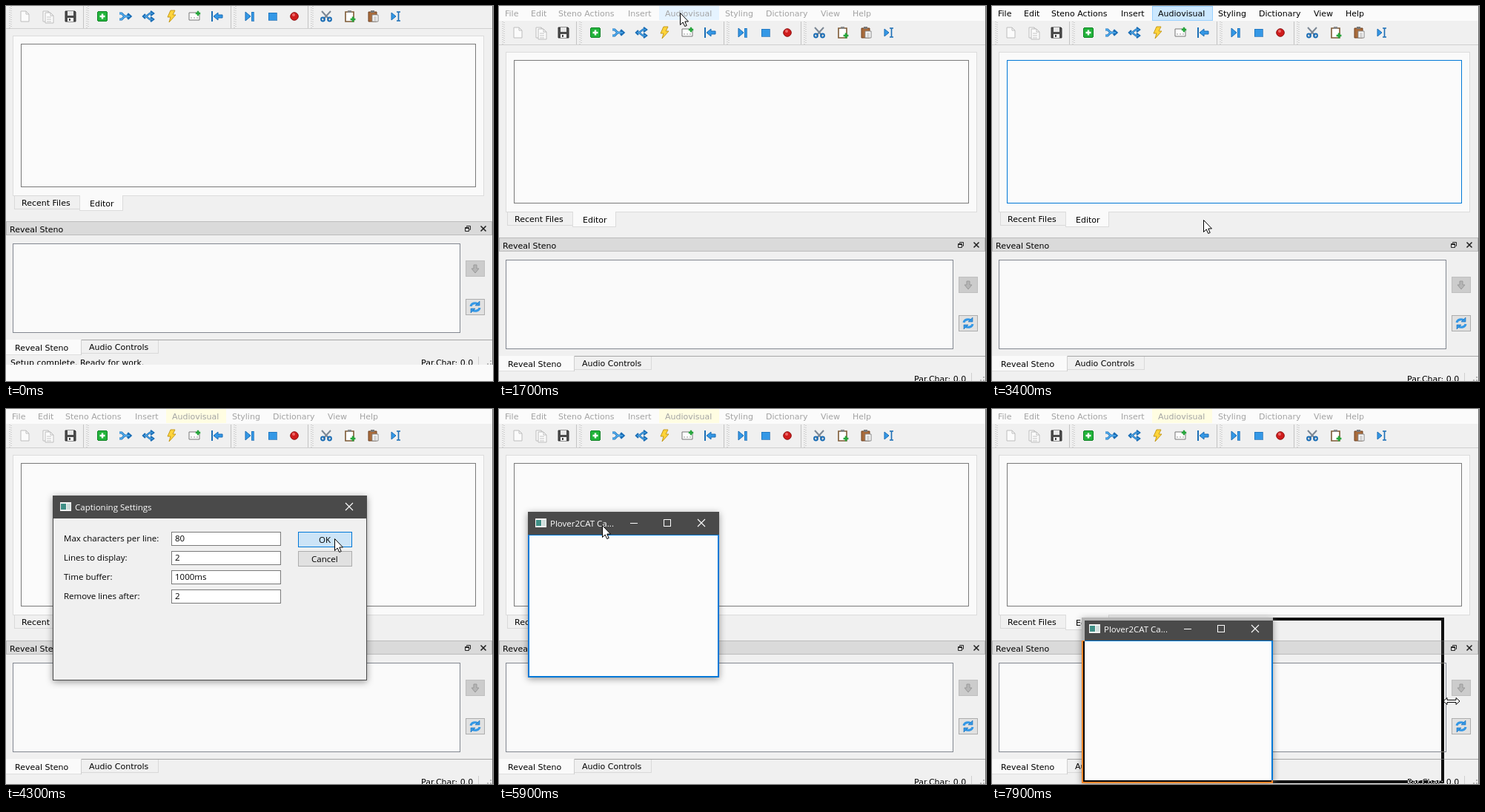
Recreate the animation shown at these times as an HTML page. Size 657x507 px, loop 8 s.

```html
<!DOCTYPE html>
<html lang="en">
<head>
<meta charset="utf-8">
<title>Captioning window demo</title>
<style>
html, body { margin: 0; width: 100%; height: 100%; overflow: hidden; background: #f0f0f0; }
svg { display: block; width: 657px; height: 507px; }
text { font: 11px "DejaVu Sans", Verdana, sans-serif; white-space: pre; }
.ui text { font: 11.5px "Open Sans", "Noto Sans", sans-serif; }
rect { shape-rendering: crispEdges; }
.win { filter: drop-shadow(0 2px 5px rgba(0, 0, 0, .4)); }
#band { mix-blend-mode: difference; }
</style>
</head>
<body>
<svg id="stage" viewBox="0 0 657 507"></svg>
<script>
const BLUE = '#3498e6', DEEP = '#1a6db5', FOCUS = '#0078d7';

const box = (x, y, w, h, fill, more = '') =>
  `<rect x="${x}" y="${y}" width="${w}" height="${h}" fill="${fill}" ${more}/>`;
const frame = (x, y, w, h, fill, line, more = '') =>
  box(x + .5, y + .5, w - 1, h - 1, fill, `stroke="${line}" ${more}`);
const label = (x, y, s, fill = '#000', more = '') =>
  `<text x="${x}" y="${y}" fill="${fill}" ${more}>${s}</text>`;
const path = (d, fill = 'none', line = 'none', w = 1) =>
  `<path d="${d}" fill="${fill}" stroke="${line}" stroke-width="${w}"/>`;
const put = (x, y, s, id = '') => `<g ${id && `id="${id}"`} transform="translate(${x} ${y})">${s}</g>`;

// Icons, each centred on 0,0
const plus = (x, y, r, w, c) => path(`M${x - r} ${y}h${2 * r}M${x} ${y - r}v${2 * r}`, 'none', c, w);
const sheet = (x, y) => path(`M${x} ${y}h7l4 4v10h-11z`, '#fbfbfb', '#bdbdbd') +
  path(`M${x + 7} ${y}v4h4`, 'none', '#bdbdbd');
const play = path('M-5 -6L2 0L-5 6z', BLUE, DEEP) + box(3, -6, 3, 12, BLUE, `stroke="${DEEP}" stroke-width=".7"`);
const stop = box(-5, -5, 11, 10, BLUE, `stroke="${DEEP}" stroke-width=".7"`);
const record = '<circle r="5.3" fill="#d01c1c" stroke="#8e1010"/><circle cx="-1" cy="-2" r="2" fill="#ec6a6a"/>';
const skip = path('M-6 -5L-1 0L-6 5zM-1 -5L4 0L-1 5z', BLUE, DEEP, .7) + box(4, -5, 2, 10, DEEP);
const board = path('M-6 -6h11v13h-11z', '#fff', '#7d5a35', 1.6) + box(-3, -8, 5, 3, '#888');
const icons = [
  [25, sheet(-5, -7)],
  [56, sheet(-6, -7) + sheet(-3, -5) + path('M-1 1h6M-1 4h6M-1 7h6', 'none', '#c4c4c4')],
  [87, path('M-7 -7h13l1 1v13h-14z', '#4b4b4b', '#333') + box(-4, -7, 8, 6, '#e8e8e8') + box(-4, 2, 8, 5, '#fff') + box(-2, 3, 2, 3, '#444')],
  [130, '<rect x="-6.5" y="-6.5" width="13" height="13" rx="2" fill="#22b33b" stroke="#128427"/>' + plus(0, 0, 3.5, 2.4, '#fff')],
  [160, path('M-7 -4h3l4 4l-4 4h-3M0 0h7M4 -3.5l4 3.5l-4 3.5', 'none', DEEP, 3) + path('M-7 -4h3l4 4l-4 4h-3M0 0h7', 'none', '#58b5f5', 1.3)],
  [192, path('M-7 0h4l5 -4h4M-3 0l5 4h4M-4 -3l-3 3l3 3M3 -7l4 3l-4 3M3 1l4 3l-4 3', 'none', DEEP, 2.3) + path('M-6 0h3l5 -4h4M-3 0l5 4h4', 'none', '#58b5f5', 1)],
  [223, path('M-1 -8h6l-3 6h4l-9 10l2 -7h-4z', '#ffd43a', '#c49a1c')],
  [254, path('M-7 -5h14v10h-14z', '#fdfdfd', '#777') + path('M-5 2h2m2 0h2m2 0h2', 'none', '#999') + plus(5, -4, 3.2, 2.4, '#25a63b')],
  [285, path('M-7 -7v14', 'none', DEEP, 2) + path('M-5 0l6 -5v3h6v4h-6v3z', BLUE, DEEP)],
  [328, play], [359, stop], [389, record],
  [432, path('M-6 -7L4 4M6 -7L-4 4', 'none', '#7b8794', 2) +
    `<circle cx="-4.5" cy="4" r="2.4" fill="none" stroke="${DEEP}" stroke-width="2"/><circle cx="4.5" cy="4" r="2.4" fill="none" stroke="${DEEP}" stroke-width="2"/>`],
  [464, board + plus(4, 4, 3.4, 2.6, '#25a63b')],
  [495, path('M-6 -6h11v13h-11z', '#a96b3b', '#6f4322') + box(-3, -8, 5, 3, '#777') + path('M-1 -2h8v9h-8z', '#fff', '#888') + path('M1 1h4M1 3h4M1 5h4', 'none', '#aaa')],
  [526, path('M-6 -5L0 0L-6 5z', BLUE, DEEP) + path('M1 -6h5M1 6h5M3.5 -6v12', 'none', DEEP, 1.6)],
];

const bar = [[8, 'File'], [43, 'Edit'], [80, 'Steno Actions'], [174, 'Insert'], [224, 'Audiovisual'],
  [305, 'Styling'], [360, 'Dictionary'], [434, 'View'], [477, 'Help']];

const grip = x => path(`M${x} 21V52M${x + 2} 22V52`, 'none', '#b4b4b4').replace('/>', ' stroke-dasharray="1 2"/>');

const main = box(0, 0, 657, 507, '#f0f0f0') + box(0, 0, 656, 20, '#fbfbfb') +
  box(216, 0, 81, 19, 'none', 'id="hot"') +
  `<g id="bar">${bar.map(([x, s]) => `<text x="${x}" y="14">${s}</text>`).join('')}</g>` +
  [5, 109, 308, 412].map(grip).join('') +
  [104, 303, 407].map(x => box(x, 21, 1, 31, '#c3c3c3')).join('') + box(0, 52, 656, 1, '#cfcfcf') +
  icons.map(([x, s]) => put(x, 36, s)).join('') +
  frame(9, 62, 636, 217, '#fafafa', '#dcdcdc') +
  frame(20, 73, 614, 194, '#fbfbfb', '#7a7a7a', 'id="edit"') +
  frame(11, 278, 89, 19, '#f0f0f0', '#d9d9d9') + frame(99, 278, 59, 21, '#fafafa', '#dcdcdc') + box(100, 277, 57, 3, '#fafafa') +
  label(21, 292, 'Recent Files') + label(113, 293, 'Editor') +
  frame(0, 313, 656, 19, '#dadada', '#bcbcbc') + label(5, 328, 'Reveal Steno') +
  path('M621.5 320.5v-1h5v5h-1M619.5 321.5h5v5h-5zM619 322.5h6', 'none', '#222') +
  path('M640.5 319.5l7 7M647.5 319.5l-7 7', 'none', '#222', 1.6) +
  frame(9, 343, 604, 121, '#fafafa', '#828790') +
  frame(620, 366, 26, 22, '#cccccc', '#bfbfbf') +
  path('M631 372h4v5h3l-5 6l-5 -6h3z', '#b5b5b5', '#999') +
  frame(620, 418, 26, 22, '#e1e1e1', '#adadad') +
  path('M627 428a6 5 0 0 1 10 -3M639 430a6 5 0 0 1 -10 3', 'none', BLUE, 3) +
  path('M639 421v6h-6zM627 437v-6h6z', BLUE, DEEP, .6) +
  box(0, 473, 656, 1, '#a6a6a6') + box(0, 473, 101, 21, '#fafafa') + box(101, 473, 1, 21, '#cfcfcf') + box(0, 493, 101, 1, '#dedede') +
  box(102, 491, 104, 1, '#d9d9d9') + box(205, 474, 1, 18, '#d9d9d9') +
  label(12, 488, 'Reveal Steno') + label(112, 487, 'Audio Controls') +
  label(6, 508, 'Setup complete. Ready for work.', '#000', 'id="status"') + label(560, 508, 'Par.Char: 0.0') +
  box(637, 496, 1, 12, '#d0d0d0') +
  [[653, 501], [653, 505], [649, 505]].map(([x, y]) => box(x, y, 2, 2, '#b9b9b9')).join('') +
  box(656, 0, 1, 507, '#6a6a6a');

// Dropdown: [row centre, text, shortcut, icon, disabled]
const folder = path('M-6 -6h6v13h-6z', '#f3cf73', '#b98f35') + path('M-2 -6h8v13h-8z', '#fff5d2', '#b98f35') +
  path('M2 3v-6l3 1', 'none', DEEP, 1.4) + `<circle cx="1" cy="3" r="1.7" fill="${DEEP}"/>`;
const items = [
  [33, 'Open Audiovisual', 'Ctrl+Shift+O', folder], [55, 'Play/Pause', 'Ctrl+P', play], [77, 'Stop', 'Ctrl+W', stop],
  [108, 'Skip Forward', 'Ctrl+L', skip], [130, 'Skip Back', 'Ctrl+J', `<g transform="scale(-1 1)">${skip}</g>`],
  [152, 'Speed Up', 'Ctrl+Shift+G'], [174, 'Slow Down', 'Ctrl+Shift+S'], [205, 'Show/Hide Video'],
  [236, 'Record/Pause', 'Ctrl+Shift+P', record], [258, 'Stop Recording', '', '', 1],
  [289, 'Captioning'], [311, 'Flush Caption'], [342, 'Add/Change All Audio Timestamps', '', '', 1],
];
const menu = box(219, 22, 323, 337, '#000', 'opacity=".14"') + box(218, 21, 322, 336, '#000', 'opacity=".3"') +
  frame(216, 19, 323, 336, '#f2f2f2', '#a0a0a0') + box(219, 22, 316, 21, '#91c9f7', 'id="pick"') +
  [92, 189, 220, 273, 326].map(y => box(247, y, 288, 1, '#d4d4d4')).join('') +
  items.map(([y, s, key = '', icon = '', off]) => {
    const c = off ? '#7b7b7b' : '#000';
    return label(251, y + 4, s, c) + label(452, y + 4, key, c) + put(230, y - 1, icon);
  }).join('');

const winIcon = box(10, 9, 15, 12, '#f4f4f4') + box(11, 11, 7, 8, '#3f8f86') + box(19, 11, 5, 8, '#cfdedc');
const cross = x => path(`M${x - 5} 10l10 10M${x + 5} 10l-10 10`, 'none', '#fff', 1.1);

// Settings dialog
const rows = [['Max characters per line:', '80'], ['Lines to display:', '2'], ['Time buffer:', '1000ms'], ['Remove lines after:', '2']];
const dialog = `<g class="win">${box(63, 117, 424, 250, '#4a4a4a')}</g>` + box(64, 148, 422, 218, '#f0f0f0') +
  put(63, 117, winIcon + label(30, 20, 'Captioning Settings', '#fff') + cross(400)) +
  rows.map(([name, value], i) => {
    const y = 166 + 26 * i;
    return label(78, y + 13, name) + frame(223, y, 148, 19, '#fff', '#7a7a7a', 'class="field"') + label(228, y + 13, value);
  }).join('') +
  frame(394, 166, 73, 21, '#e1e1e1', FOCUS, 'id="ok"') + label(422, 181, 'OK') +
  frame(394, 192, 73, 21, '#e1e1e1', '#adadad') + label(412, 207, 'Cancel');

// Caption window, 258 x 224
const caption = `<g class="win">${box(0, 0, 258, 224, '#4a4a4a')}</g>` +
  box(0, 31, 258, 193, FOCUS, 'id="rim"') + box(2, 32, 254, 190, '#fcfcfc') + box(0, 31, 257, 2, FOCUS, 'id="top"') +
  winIcon + label(30, 20, 'Plover2CAT Ca...', '#fff') +
  box(138, 15, 10, 1, '#fff') + frame(183, 10, 10, 10, 'none', '#fff') + cross(234);

const cursors = {
  arrow: path('M.5 .5V16.5L4.2 13L6.7 18.5L9.2 17.5L6.8 12H11.5z', '#fff', '#000'),
  beam: path('M-3.5 -8h3l.5 1l.5 -1h3M0 -7v14M-3.5 8h3l.5 -1l.5 1h3', 'none', '#333'),
  size: path('M-11 0l5 -4.5v3h12v-3l5 4.5l-5 4.5v-3h-12v3z', '#fff', '#000'),
};

const stage = document.getElementById('stage');
stage.innerHTML = `<g id="main">${main}</g>` + box(0, 485, 657, 22, '#fafafa', 'id="strip"') +
  `<g id="menu" class="ui">${menu}</g><g id="dialog" class="ui">${dialog}</g><g id="caption" class="ui">${caption}</g>` +
  box(123, 284, 485, 220, 'none', 'id="band" stroke="#fff" stroke-width="4"') +
  Object.entries(cursors).map(([id, s]) => put(0, 0, s, id)).join('');

const $ = id => document.getElementById(id);
const fields = [...document.querySelectorAll('.field')];
const show = (id, on) => { $(id).style.display = on ? '' : 'none'; };
const move = (id, x, y) => $(id).setAttribute('transform', `translate(${x} ${y})`);
const set = (node, key, value) => node.setAttribute(key, value);
const last = (table, t) => table.filter(row => row[0] <= t).pop();

// Pointer steps: [ms, x, y, shape]
const steps = [
  [0, 0, 0], [100, 531, 1, 'arrow'], [200, 0, 0],
  [1300, 425, 160, 'beam'], [1400, 350, 95, 'beam'], [1500, 298, 48, 'arrow'], [1600, 262, 20, 'arrow'], [1700, 244, 9, 'arrow'],
  [2400, 247, 29, 'arrow'], [2500, 250, 52, 'arrow'], [2600, 257, 104, 'arrow'], [2700, 266, 165, 'arrow'],
  [2800, 275, 228, 'arrow'], [2900, 282, 272, 'arrow'], [3000, 285, 289, 'arrow'],
  [3700, 300, 272, 'arrow'], [3800, 350, 222, 'arrow'], [3900, 400, 194, 'arrow'], [4000, 432, 180, 'arrow'], [4100, 443, 175, 'arrow'],
  [4500, 445, 176, 'beam'],
  [4800, 430, 174, 'beam'], [4900, 337, 153, 'beam'], [5000, 224, 92, 'beam'], [5100, 128, 40, 'beam'], [5200, 70, 8, 'arrow'], [5300, 51, 3, 'arrow'],
  [6600, 230, 308, 'arrow'], [6700, 268, 336, 'beam'], [6800, 320, 364, 'beam'], [6900, 366, 384, 'beam'], [7000, 382, 390, 'size'],
  [7500, 424, 391, 'size'], [7600, 476, 392, 'size'], [7700, 555, 396, 'size'], [7800, 603, 395, 'size'], [7900, 620, 395, 'size'],
];
const drag = [[0, 0], [5600, .03], [5700, .14], [5800, .32], [5900, .52], [6000, .7], [6100, .85], [6200, .95], [6300, 1]];
const edges = [[0, 380], [7500, 413], [7600, 468], [7700, 555], [7800, 596], [7900, 610]];

function draw(t) {
  let [, x, y, shape] = last(steps, t);
  const active = t >= 2000 && t < 3500;
  const p = last(drag, t)[1];
  if (t >= 5600 && t < 6600) { x = 51 + 170 * p; y = 3 + 297 * p; }

  move('main', 0, t < 1200 ? -22 : 0);
  show('strip', t < 1200);
  show('status', t < 1700);
  set($('bar'), 'fill', active ? '#000' : '#a3a3a3');
  set($('hot'), 'fill', t < 1700 ? 'none' : t < 2000 ? '#e5f3ff' : active ? '#cce8ff' : '#fffde2');
  set($('hot'), 'stroke', active ? '#99d1ff' : 'none');
  set($('edit'), 'stroke', active ? FOCUS : '#7a7a7a');

  show('menu', t >= 2100 && t < 3400);
  const row = t >= 2400 && items.find(([c]) => Math.abs(c - y) <= 11);
  show('pick', row);
  if (row) set($('pick'), 'y', row[0] - 11);

  show('dialog', t >= 3500 && t < 4500);
  fields.forEach((f, i) => {
    const over = x > 223 && x < 371 && Math.abs(y - 175 - 26 * i) < 10;
    set(f, 'stroke', over ? FOCUS : '#7a7a7a');
  });
  set($('ok'), 'fill', t >= 4300 ? '#cce4f7' : t >= 4000 ? '#e5f1fb' : '#e1e1e1');

  show('caption', t >= 4600);
  move('caption', Math.round(-49 + 170 * p), Math.round(-15 + 297 * p));
  set($('rim'), 'fill', t < 5600 ? '#565656' : FOCUS);
  show('top', t < 5600);

  show('band', t >= 7500);
  set($('band'), 'width', last(edges, t)[1] - 125);

  for (const id in cursors) show(id, id === shape);
  if (shape) move(shape, Math.round(x), Math.round(y));
}

function tick() {
  draw(performance.now() % 8000);
  requestAnimationFrame(tick);
}
tick();
</script>
</body>
</html>
```
